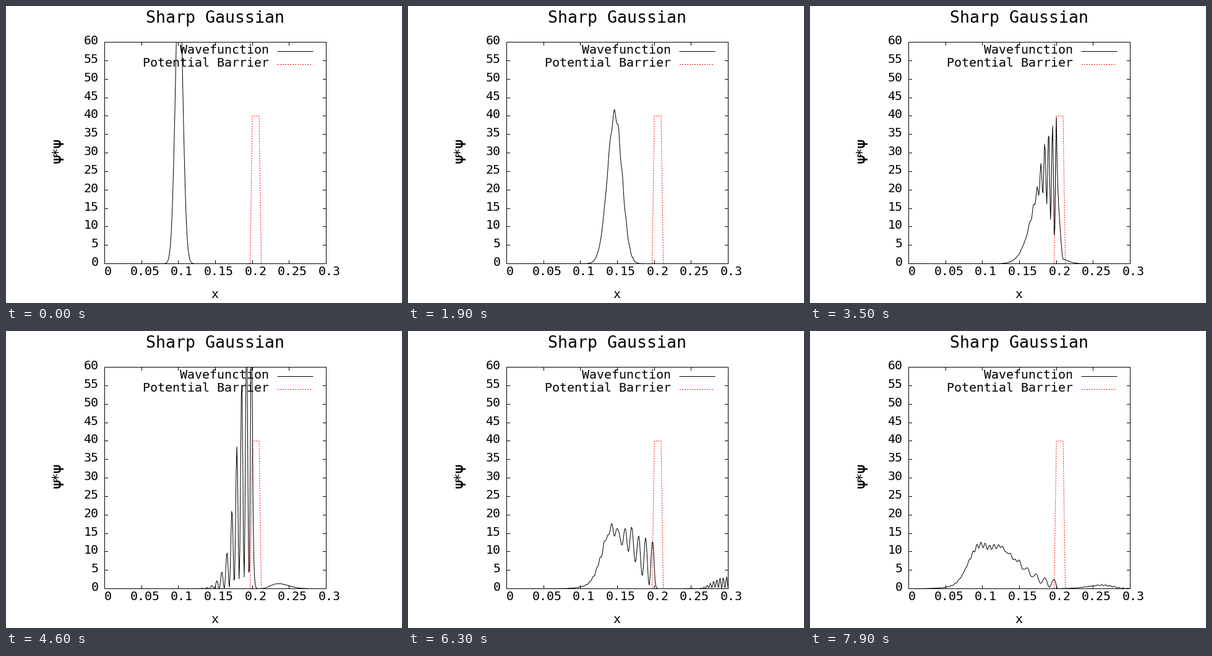
These frames come from a looping animation (640x480 px, 8000 ms). A matplotlib script:

```python
import numpy as np
import matplotlib.pyplot as plt
from matplotlib.animation import FuncAnimation
from matplotlib.patches import Rectangle

W, H, DPI = 640, 480, 100
FRAMES, INTERVAL = 80, 100
LEFT, RIGHT, TOP, BOTTOM = 159.5, 517.5, 58.5, 416.5
X_MAX, Y_MAX = 0.3, 60
PX = 72 / DPI
MONO = "DejaVu Sans Mono"


def px(x):
    return LEFT + np.asarray(x) * (RIGHT - LEFT) / X_MAX


def py(y):
    return BOTTOM - np.asarray(y) * (BOTTOM - TOP) / Y_MAX


# Schroedinger equation in a box, hbar = m = 1
N, DX = 300, 0.001
DT, STEPS, START = 5e-7, 10, 3
X0, WIDTH, K0, V0 = 0.1, 0.005, 500, 2e5


def barrier(x):
    return (x > 0.2) & (x < 0.21)


def solve():
    """Leapfrog the real and imaginary parts, keeping one density per frame."""
    x = np.arange(N + 1) * DX
    pot = V0 * barrier(x)

    def ham(f):
        out = np.zeros_like(f)
        out[1:-1] = (f[1:-1] - (f[2:] + f[:-2]) / 2) / DX**2
        return out + pot * f

    amp = np.exp(-((x - X0) / (2 * WIDTH)) ** 2)
    amp /= np.sqrt(np.sum(amp**2) * DX)
    re, im = amp * np.cos(K0 * x), amp * np.sin(K0 * x)
    density = []
    for step in range(START + STEPS * (FRAMES - 1) + 1):
        if step >= START and (step - START) % STEPS == 0:
            density.append(re**2 + im**2)
        im = im - DT * ham(re)
        re = re + DT * ham(im)
    return x, density


x, density = solve()

fig = plt.figure(figsize=(W / DPI, H / DPI), dpi=DPI, facecolor="white")
ax = fig.add_axes([0, 0, 1, 1])
ax.set_xlim(0, W)
ax.set_ylim(H, 0)
ax.axis("off")


def line(xs, ys, color="black", **kw):
    return ax.plot(xs, ys, color=color, lw=PX, snap=False, **kw)[0]


def label(x, y, s, size=20, ha="center", **kw):
    kw.setdefault("family", MONO)
    kw.setdefault("va", "baseline")
    return ax.text(x, y, s, fontsize=size * PX, ha=ha, **kw)


label(338, 27, "Sharp Gaussian", 26.67)
label(337, 472, "x")
for y in (247, 222):
    label(86.5, y, "Ψ", 23, va="center", rotation=90, family="Liberation Mono", weight="bold")
label(84, 235, "*", 24, va="center", rotation=90)

TICK = 5
for v in np.arange(0, Y_MAX + 1, 5):
    y = np.floor(py(v)) + 0.5
    line([LEFT, LEFT + TICK], [y, y])
    line([RIGHT - TICK, RIGHT], [y, y])
    label(149.5, y + 3.5, f"{v}", ha="right")
for v in np.arange(7) * 0.05:
    t = np.floor(px(v)) + 0.5
    line([t, t], [BOTTOM, BOTTOM - TICK])
    line([t, t], [TOP, TOP + TICK])
    label(t + 4.8, 435, f"{v:.2g}")

label(352.8, 77, "Wavefunction")
label(323.2, 98, "Potential Barrier")
dots = dict(color="red", dashes=(2, 2), dash_capstyle="butt")
line([439, 496], [73.5, 73.5])
line([439, 494], [94.5, 94.5], **dots)

samples = np.linspace(0, X_MAX, 100)
line(px(samples), py(40 * barrier(samples + 1e-9)), **dots)
wave = line([], [])
wave.set_clip_path(Rectangle((LEFT, TOP), RIGHT - LEFT, BOTTOM - TOP + 0.5,
                             transform=ax.transData))
line([LEFT, RIGHT, RIGHT, LEFT, LEFT], [TOP, TOP, BOTTOM, BOTTOM, TOP])


def update(i):
    wave.set_data(px(x), py(density[i]))
    return (wave,)


anim = FuncAnimation(fig, update, frames=FRAMES, interval=INTERVAL,
                     repeat=True, repeat_delay=0, blit=False)
plt.show()
```
